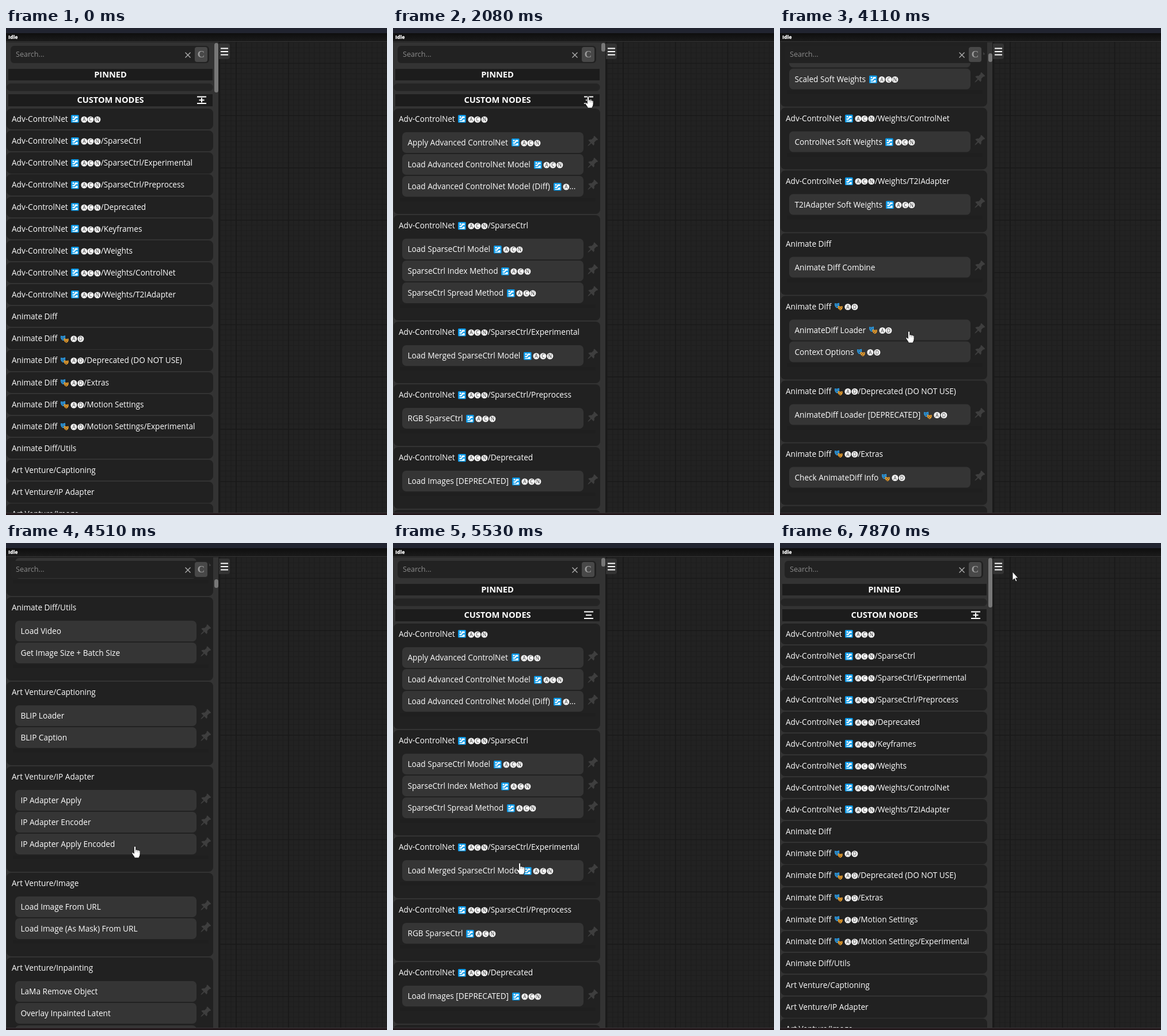
An HTML page for the animation above (8000 ms loop, 662 by 846 pixels).

```html
<!DOCTYPE html>
<html lang="en">
<head>
<meta charset="utf-8">
<title>Node sidebar</title>
<style>
html, body { margin: 0; width: 100%; height: 100%; overflow: hidden; background: #222; }
#stage { position: absolute; left: 0; top: 0; width: 662px; height: 846px; overflow: hidden; color: #fff;
  font: 13.6px/36px "Open Sans", "Noto Sans", sans-serif; white-space: pre; }
#stage div, .layer { position: absolute; }
.layer { left: 0; top: 0; }
#top { left: 0; top: 0; width: 662px; height: 24px;
  background: linear-gradient(#212430 0 9px, #0e0e0e 9px, #1b1b1b 23px, #343434 23px); }
#idle { left: 4px; top: 10px; font-size: 8.6px; line-height: 12px; font-weight: 800; }
#panel { left: 0; top: 25px; width: 369px; height: 817px; overflow: hidden; background: #333; }
#content { left: 0; top: -25px; width: 361px; height: 0; }
.bar { left: 4px; width: 355px; height: 20.5px; background: #1c1c1c; text-align: center;
  font-size: 14.6px; font-weight: 700; line-height: 19px; }
.pill { left: 1px; top: 96px; width: 357px; height: 12px; border: 1px solid #2a2a2a; border-radius: 7px; background: #242424; }
.group { left: 1px; width: 359px; border-radius: 8px; background: #212121; }
.name { left: 9px; top: 0; }
.item { left: 15px; width: 305.5px; height: 36px; padding-left: 9.5px; border-radius: 7px; background: #353535; }
.foot { left: 11px; width: 340px; height: 6px; background: #1f1f1f; }
.pin { position: absolute; left: 334px; }
.ico { vertical-align: -2px; overflow: visible; }
#search { left: 8px; top: 6px; width: 345px; height: 30px; border-radius: 6px; background: #222;
  color: #8c8c8c; font-size: 12.6px; line-height: 29px; text-indent: 9px; }
#clear { left: 320px; top: 2px; width: 22px; height: 26px; border-radius: 4px; background: #484848; color: #9c9c9c;
  font: bold 17px/26px "Liberation Serif", serif; text-indent: 0; text-align: center; }
#thumb { left: 362px; width: 7px; border-radius: 4px; background: #777; }
</style>
</head>
<body>
<div id="stage">
  <svg id="back" class="layer" width="662" height="846"></svg>
  <div id="top"><div id="idle">Idle</div></div>
  <div id="panel">
    <div id="content">
      <div class="bar" style="top:70.5px">PINNED</div>
      <div class="pill"></div>
      <div class="bar" style="top:115px">CUSTOM NODES</div>
      <svg class="layer" width="361" height="140" stroke="#fff" stroke-width="2">
        <path d="M332 119.5H348M332 131H348"/><path id="toggle"/>
      </svg>
      <div id="closed" class="layer"></div>
      <div id="open" class="layer"></div>
    </div>
    <div id="search">Search...<div id="clear">C</div>
      <svg class="layer" width="345" height="30"><path d="M303.5 11.5l9 9m0-9l-9 9" stroke="#b0b0b0" stroke-width="1.4"/></svg>
    </div>
    <div id="thumb"></div>
  </div>
  <svg class="layer" width="662" height="846">
    <path d="M370 27H385a4 4 0 0 1 4 4V50a4 4 0 0 1-4 4H370Z" fill="#333"/>
    <path d="M373 35.5H386M373 41H386M373 46.5H386" stroke="#fff" stroke-width="1.8"/>
    <path d="M0 842.5H662" stroke="#3a3538"/>
    <path d="M0 844.5H662" stroke="#22171a" stroke-width="3"/>
    <g id="cursor" fill="#fff" stroke="#111" stroke-width=".9" stroke-linejoin="round">
      <path id="arrow" d="M0 0V15L3.4 11.8 5.7 17 7.9 16 5.6 10.9H10Z"/>
      <g id="hand">
        <path d="M-1.6 1.4a1.6 1.6 0 0 1 3.2 0V6.6a1.5 1.5 0 0 1 2.9.4 1.4 1.4 0 0 1 2.6.5 1.2 1.2 0 0 1 2 1V13q0 3.5-1.9 5.6V20H-1V18.6L-4.8 13q-1.1-2 .5-2.5 1-.2 2.7 1.8Z"/>
        <path d="M1.6 6.6V10M4.5 7V10.3M7.1 7.6V10.6" fill="none" stroke="#666" stroke-width=".6"/>
      </g>
    </g>
  </svg>
</div>
<script>
(() => {
const $ = id => document.getElementById(id);
const LOOP = 8000, BEAT = 80, ROW = 38.13, FIRST = 140;

// @ and # stand for icon runs, ~ for the clipped run
const GROUPS = `Adv-ControlNet @|Apply Advanced ControlNet @|Load Advanced ControlNet Model @|Load Advanced ControlNet Model (Diff) ~
Adv-ControlNet @/SparseCtrl|Load SparseCtrl Model @|SparseCtrl Index Method @|SparseCtrl Spread Method @
Adv-ControlNet @/SparseCtrl/Experimental|Load Merged SparseCtrl Model @
Adv-ControlNet @/SparseCtrl/Preprocess|RGB SparseCtrl @
Adv-ControlNet @/Deprecated|Load Images [DEPRECATED] @
Adv-ControlNet @/Keyframes|Timestep Keyframe @|Latent Keyframe @
Adv-ControlNet @/Weights|Default Weights @|Scaled Soft Weights @
Adv-ControlNet @/Weights/ControlNet|ControlNet Soft Weights @
Adv-ControlNet @/Weights/T2IAdapter|T2IAdapter Soft Weights @
Animate Diff|Animate Diff Combine
Animate Diff #|AnimateDiff Loader #|Context Options #
Animate Diff #/Deprecated (DO NOT USE)|AnimateDiff Loader [DEPRECATED] #
Animate Diff #/Extras|Check AnimateDiff Info #
Animate Diff #/Motion Settings|Motion Model Settings #|Simple Settings #
Animate Diff #/Motion Settings/Experimental|Custom Settings #
Animate Diff/Utils|Load Video|Get Image Size + Batch Size
Art Venture/Captioning|BLIP Loader|BLIP Caption
Art Venture/IP Adapter|IP Adapter Apply|IP Adapter Encoder|IP Adapter Apply Encoded
Art Venture/Image|Load Image From URL|Load Image (As Mask) From URL
Art Venture/Inpainting|LaMa Remove Object|Overlay Inpainted Latent|Prepare Image & Mask For Inpaint|Overlay Inpainted Image
Art Venture/Loaders|VAE Loader|Lora Loader|Lora List Loader|Lora List Stacker|Checkpoint Loader
Art Venture/Utils|Image Switch|Seed Selector`.split("\n").map(line => line.split("|"));

const icon = (gap, body) => `<svg class="ico" width="13.6" height="13.6" style="margin:0 ${gap}px 0 2.3px">${body}</svg>`;
const passport = icon(2.5, `<rect width="13.6" height="13.6" rx="1.5" fill="#0d9bea"/>
  <g fill="#fff"><circle cx="4" cy="3.6" r="1.5"/><path d="M7 2.5h4.5v3H8.5L6 9H2.5V6.5h3Z"/><path d="M2.5 10.5H7l2-2.5h2.5v4h-9Z"/></g>`);
const masks = icon(3.3, `<path d="M0 1.5Q4 3 8 1V6Q7 10 4 10Q1 9 0 5Z" fill="#2c9be4"/>
  <path d="M5.5 6Q9 8 13.6 6.5V10Q12 14 9 13.6Q6 12 5.5 9Z" fill="#f0a22e"/>
  <path d="M1.5 4.3h2m1.3 0h1.6M2.5 7q1.7 1 3.2-.3M7 9h1.7m1.7 0h1.7M8 12q1.5-1.4 3 0" stroke="#222" fill="none" stroke-width=".9"/>`);
const letters = s => [...s].map(c => `<svg class="ico" width="11.7" height="12"><circle cx="5.85" cy="6" r="5.5" fill="#f4f4f4"/>
  <text x="5.85" y="9" text-anchor="middle" font-size="8.4" fill="#333">${c}</text></svg>`).join("");
const runs = { "&": "&amp;", "@": passport + letters("ACN"), "#": masks + letters("AD"), "~": passport + letters("A") + "..." };
const rich = s => s.replace(/[&@#~]/g, c => runs[c]);

const group = (name, y, height, inner = "") =>
  `<div class="group" style="top:${y}px;height:${height}px"><div class="name">${rich(name)}</div>${inner}</div>`;
const item = (text, i) => {
  const y = 41 + i * ROW;
  return `<div class="item" style="top:${y}px">${rich(text)}</div>
    <svg class="pin" style="top:${y + 5}px" width="22" height="24"><path transform="translate(11 11.5) rotate(45)"
    d="M-4.5-10H4.5V-8L3.3-7V-2Q6.5 0 6.5 3H1V8L0 11-1 8V3H-6.5Q-6.5 0-3.3-2V-7L-4.5-8Z" fill="#3e3e3e"/></svg>`;
};

let groupY = FIRST, closedRows = "", openRows = "";
GROUPS.forEach(([name, ...items], i) => {
  const pitch = 70.8 + ROW * items.length;
  closedRows += group(name, FIRST + i * ROW, ROW - 1.8);
  openRows += group(name, groupY, pitch - 2, items.map(item).join("") + `<div class="foot" style="top:${pitch - 30}px"></div>`);
  groupY += pitch;
});
$("closed").innerHTML = closedRows;
$("open").innerHTML = openRows;

// Graph canvas behind the panel
const grid = (step, x0, y0) => {
  let d = "";
  for (let x = x0; x < 662; x += step) d += `M${x} 24V842`;
  for (let y = y0; y < 842; y += step) d += `M369 ${y}H662`;
  return d;
};
$("back").innerHTML = `<path d="${grid(9.08, 372.5, 25)}" stroke="#1e1e1e" stroke-width=".8"/>
  <path d="${grid(90.8, 400, 61.5)}" stroke="#191919" stroke-width="1.4"/>
  <path d="M370.5 24V842" stroke="#1a1a1a" stroke-width="3"/>`;

// Moves are [start, end, ...value reached]; between moves the value rests
const POINTER = [[750, 1550, 339, 109], [1830, 1870, 331, 107], [1950, 2030, 339, 119], [2950, 3150, 349, 133],
  [3350, 3470, 343, 130], [3550, 3710, 226, 243], [3710, 3950, 224, 527], [4830, 4990, 238, 523],
  [4990, 5470, 220, 556], [5630, 6270, 339, 121], [7070, 7870, 404, 50]];
const SCROLL = [[3710, 4510, 1985], [4510, 4670, 2394], [4910, 4990, 2257], [4990, 5440, 0]];

const follow = (value, moves, t) => moves.reduce((v, [start, end, ...goal]) => {
  const f = Math.min(1, Math.max(0, (t - start) / (end - start)));
  return v.map((a, i) => a + (goal[i] - a) * f);
}, value);
const show = (id, on) => { $(id).style.display = on ? "" : "none"; };

function draw(time) {
  const t = Math.floor((time - 30) / BEAT) * BEAT + 30;
  const isOpen = time >= 2000 && time < 6780;
  const [x, y] = follow([535, 26], POINTER, t), [scroll] = follow([0], SCROLL, t);
  show("open", isOpen);
  show("closed", !isOpen);
  $("toggle").setAttribute("d", isOpen ? "M335 125.3H345" : "M335.5 125.3H344.5M340 121.3V129.3");
  $("content").style.transform = `translateY(${-scroll}px)`;
  $("thumb").style.top = 1 + scroll * .0186 + "px";
  $("thumb").style.height = (isOpen ? 15 : 86) + "px";
  show("cursor", t >= 750);
  show("hand", x < 355);
  show("arrow", x >= 355);
  $("cursor").setAttribute("transform", `translate(${x} ${y})`);
}

const begin = performance.now();
(function frame() {
  draw((performance.now() - begin) % LOOP);
  requestAnimationFrame(frame);
})();
})();
</script>
</body>
</html>
```
